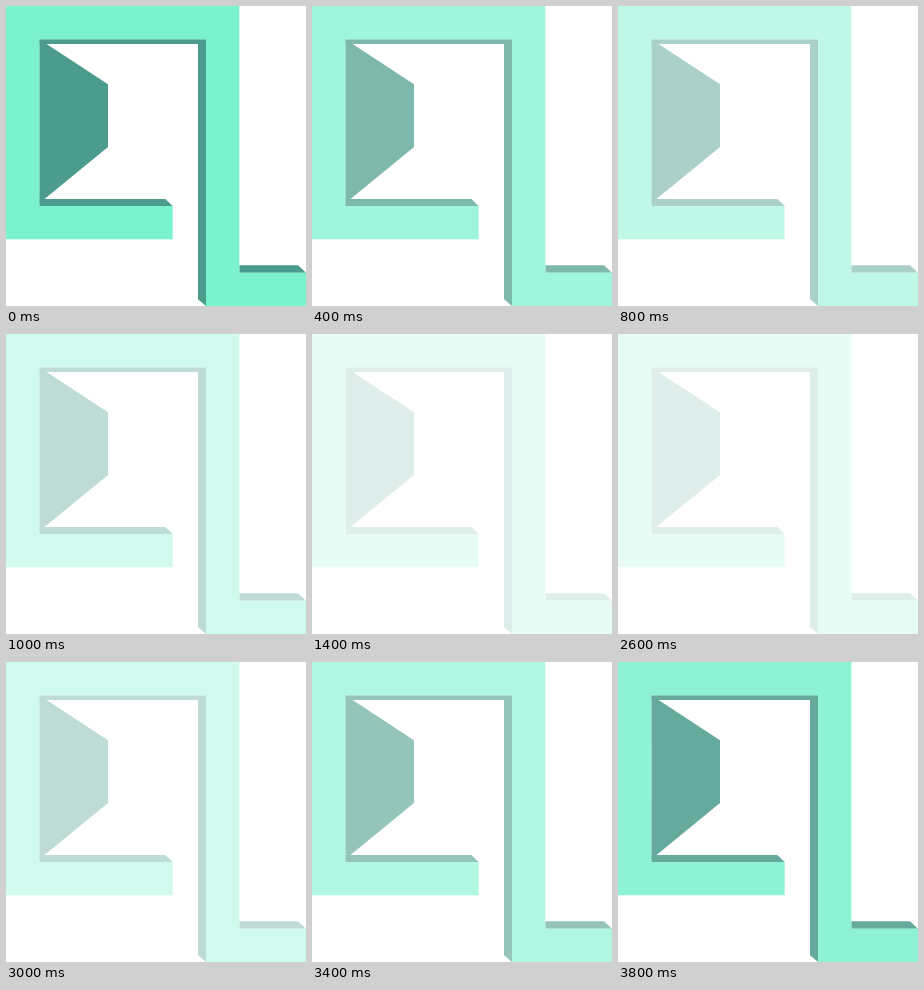
An HTML page for the animation above (4000 ms loop, 300 by 300 pixels).

```html
<!DOCTYPE html>
<html lang="en">
<head>
<meta charset="utf-8">
<title>Fading ribbon</title>
<style>
  html, body { margin: 0; width: 100%; height: 100%; overflow: hidden; background: #fff; }
  svg { display: block; width: 100%; height: 100%; }
</style>
</head>
<body>
<!-- The ribbon sits on a 9 by 9 grid of 100-unit cells. -->
<svg viewBox="0 0 900 900">
  <g id="ribbon">
    <g fill="#4b9c8c">
      <path d="M100 100L306 235V423L100 592Z"/>
      <path d="M100 100H600V900L576 880V114H100Z"/>
      <path d="M100 579H478L500 600H100Z"/>
      <path d="M700 778H876L900 800H700Z"/>
    </g>
    <path fill="#7af2cd" d="M0 0H700V800H900V900H600V100H100V600H500V700H0Z"/>
  </g>
</svg>
<script>
  const LOOP = 4000, STEP = 200;
  const ribbon = document.getElementById('ribbon');

  // Fades out and back in, in held steps, invisible at mid-loop.
  function draw(now) {
    const time = Math.floor(now % LOOP / STEP) * STEP;
    const level = Math.abs(1 - time / (LOOP / 2));
    ribbon.setAttribute('opacity', level ** 1.5);
    requestAnimationFrame(draw);
  }
  draw(performance.now());
</script>
</body>
</html>
```
